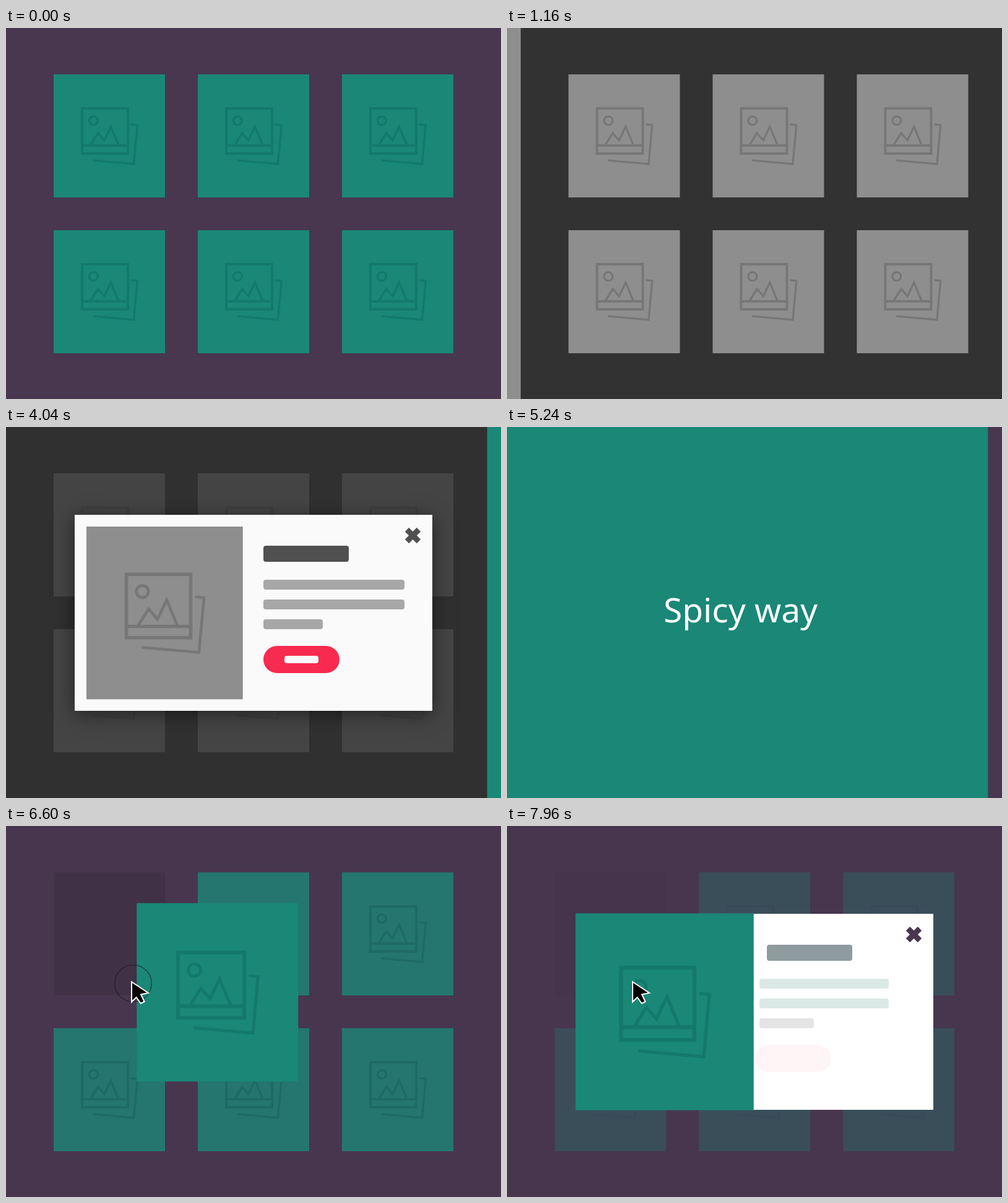
An HTML page with a canvas that plays this animation: 800x600 px, repeating every 8 s.

```html
<!DOCTYPE html>
<html lang="en">
<head>
<meta charset="utf-8">
<title>Two ways to open a card</title>
<style>
html, body { margin: 0; width: 100%; height: 100%; overflow: hidden; background: #323232; }
canvas { display: block; width: 800px; height: 600px; }
</style>
</head>
<body>
<canvas id="stage" width="800" height="600"></canvas>
<script>
const ctx = document.getElementById('stage').getContext('2d');
const LOOP = 8000, STEP = 40;
const W = 800, H = 600, CARD_W = 180, CARD_H = 199;
const COLS = [77, 310, 543], ROWS = [75, 327];

const GRAY = { bg: '#323232', card: '#8e8e8e', icon: '#777777' };
const SPICY = { bg: '#48374f', card: '#1a8777', icon: '#14796b' };

const clamp = v => Math.max(0, Math.min(1, v));
const lerp = (a, b, k) => a + (b - a) * k;
const ramp = (t, start, length) => clamp((t - start) / length);
const ease = u => u * u * (3 - 2 * u);
const glide = (t, start, length) => ease(ramp(t, start, length));

function fill(color, x, y, w, h) {
  ctx.fillStyle = color;
  ctx.fillRect(x, y, w, h);
}

function pill(color, x, y, w, h, r) {
  ctx.fillStyle = color;
  ctx.beginPath();
  ctx.roundRect(x, y, w, h, r);
  ctx.fill();
}

function trace(points) {
  ctx.beginPath();
  points.forEach(([x, y]) => ctx.lineTo(x, y));
}

function faded(alpha, draw) {
  if (alpha <= 0) return;
  ctx.save();
  ctx.globalAlpha *= alpha;
  draw();
  ctx.restore();
}

function shifted(x, draw) {
  ctx.save();
  ctx.translate(x, 0);
  draw();
  ctx.restore();
}

function card(theme, x, y, scale = 1) {
  ctx.save();
  ctx.translate(x, y);
  ctx.scale(scale, scale);
  fill(theme.card, 0, 0, CARD_W, CARD_H);
  ctx.strokeStyle = theme.icon;
  ctx.lineWidth = 4;
  ctx.strokeRect(46, 55, 74, 73);
  trace([[46, 115], [120, 115]]);
  ctx.stroke();
  ctx.lineWidth = 3.3;
  ctx.beginPath();
  ctx.arc(64.4, 74.8, 6.9, 0, 7);
  ctx.stroke();
  ctx.lineJoin = 'miter';
  trace([[59.6, 114], [71.6, 95], [81.8, 106.8], [92.4, 84.5], [104.6, 114]]);
  ctx.stroke();
  ctx.lineCap = 'round';
  trace([[126.5, 81], [135.3, 82], [129.5, 145], [65, 139.2]]);
  ctx.stroke();
  ctx.restore();
}

function grid(theme, firstGone) {
  fill(theme.bg, 0, 0, W, H);
  ROWS.forEach((y, r) => COLS.forEach((x, c) => {
    if (firstGone && !r && !c) fill('rgba(0,0,0,.13)', x, y, CARD_W, CARD_H);
    else card(theme, x, y);
  }));
}

function titleSlide(color, text) {
  fill(color, 0, 0, W, H);
  ctx.fillStyle = '#fff';
  ctx.font = '55px "Noto Sans", "Open Sans", sans-serif';
  ctx.textAlign = 'center';
  ctx.fillText(text, W / 2, 316);
}

// The new scene pushes the old one out to the left.
function push(k, before, after) {
  if (k < 1) shifted(-W * k, before);
  if (k > 0) shifted(W * (1 - k), after);
}

function cross(color, scale) {
  ctx.save();
  ctx.translate(657.5, 175.5);
  ctx.scale(scale, scale);
  ctx.strokeStyle = color;
  ctx.lineWidth = 9;
  for (const s of [1, -1]) {
    trace([[-9.5, -9.5 * s], [9.5, 9.5 * s]]);
    ctx.stroke();
  }
  ctx.restore();
}

function button(x, label) {
  pill('#f92a50', x, 354, 123, 44, 22);
  pill(label, x + 34, 370, 55, 12, 4);
}

// Times are counted from the moment the pointer sets off.
function pointer(t) {
  if (t <= 0) return;
  const tap = t - 720;
  if (tap > 0 && tap < 400) {
    faded(clamp((400 - tap) / 160), () => {
      ctx.strokeStyle = '#1c1620';
      ctx.lineWidth = 1.2;
      ctx.beginPath();
      ctx.arc(205.5, 254.5, 30.6 * (1 - (1 - tap / 400) ** 3), 0, 7);
      ctx.stroke();
    });
  }
  const k = glide(t, 0, 600);
  ctx.save();
  ctx.translate(lerp(760, 202, k), lerp(618, 250, k));
  trace([[1, 2], [1, 34.5], [8.6, 27], [15.8, 37], [21.6, 34], [16, 22.5], [28, 20]]);
  ctx.closePath();
  ctx.fillStyle = '#000';
  ctx.strokeStyle = '#fff';
  ctx.lineWidth = 2;
  ctx.fill();
  ctx.stroke();
  ctx.restore();
}

function plainModal() {
  ctx.save();
  ctx.shadowColor = 'rgba(0,0,0,.5)';
  ctx.shadowBlur = 28;
  ctx.shadowOffsetY = 5;
  fill('#fafafa', 111, 142, 578, 317);
  ctx.restore();
  card(GRAY, 130, 161, 1.404);
  pill('#505050', 416, 192, 138, 26, 4);
  [228, 228, 96].forEach((w, i) => pill('#a7a7a7', 416, 247 + 32 * i, w, 16, 4));
  button(416, '#fafafa');
  cross('#505050', 1);
}

function plainScene(t) {
  grid(GRAY);
  pointer(t - 1200);
  const k = glide(t, 2270, 410);
  faded(0.78 * k, () => fill('#303030', 0, 0, W, H));
  faded(k, plainModal);
}

// Linear flight, then a damped swing around the resting place.
function spring(ms) {
  if (ms < 160) return ms / 160;
  const s = (ms - 160) / 1000;
  return 1 + 0.32 * Math.sin(6 * Math.PI * s) * Math.exp(-4.3 * s);
}

function spicyContent(t) {
  cross(SPICY.bg, glide(t, 7720, 160));
  faded(ramp(t, 7840, 200), () =>
    pill('#445a62', lerp(396, 420, ramp(t, 7840, 120)), 192, 138, 26, 4));
  faded(ramp(t, 7920, 200), () => {
    pill('#4b9182', 408, 247, 209, 16, 4);
    pill('#4b9182', 408, 279, 209, 16, 4);
    pill('#787878', 408, 311, 88, 16, 4);
  });
  faded(ramp(t, 7951, 200), () => button(400.5, '#fff'));
}

function spicyScene(t) {
  const flight = t - 6480;
  grid(SPICY, flight > 0);
  if (flight > 0) {
    faded(0.7 * ramp(flight, 0, 400), () => fill(SPICY.bg, 0, 0, W, H));
    const k = spring(flight), split = glide(t, 7200, 600);
    if (split > 0) {
      const half = lerp(143, 289, split);
      fill('#fff', W / 2 - half, 142, half * 2, 317);
      spicyContent(t);
    }
    const scale = 1 + 0.6 * k;
    const cx = lerp(167, 400, k) - 145.2 * split, cy = lerp(174.5, 300.5, k);
    card(SPICY, cx - CARD_W * scale / 2, cy - CARD_H * scale / 2, scale);
  }
  pointer(t - 5600);
}

function draw(t) {
  if (t < 40) return grid(SPICY);
  if (t < 4000) {
    return push(glide(t, 800, 400),
      () => titleSlide(GRAY.card, 'Boring way'), () => plainScene(t));
  }
  if (t < 5200) {
    // This title slides over a scene that stays put.
    plainScene(t);
    return shifted(W * (1 - glide(t, 4000, 400)), () => titleSlide(SPICY.card, 'Spicy way'));
  }
  push(glide(t, 5200, 400),
    () => titleSlide(SPICY.card, 'Spicy way'), () => spicyScene(t));
}

const begin = performance.now();
function tick() {
  const t = (performance.now() - begin) % LOOP;
  ctx.clearRect(0, 0, W, H);
  draw(Math.floor(t / STEP) * STEP);
  requestAnimationFrame(tick);
}
tick();
</script>
</body>
</html>
```
